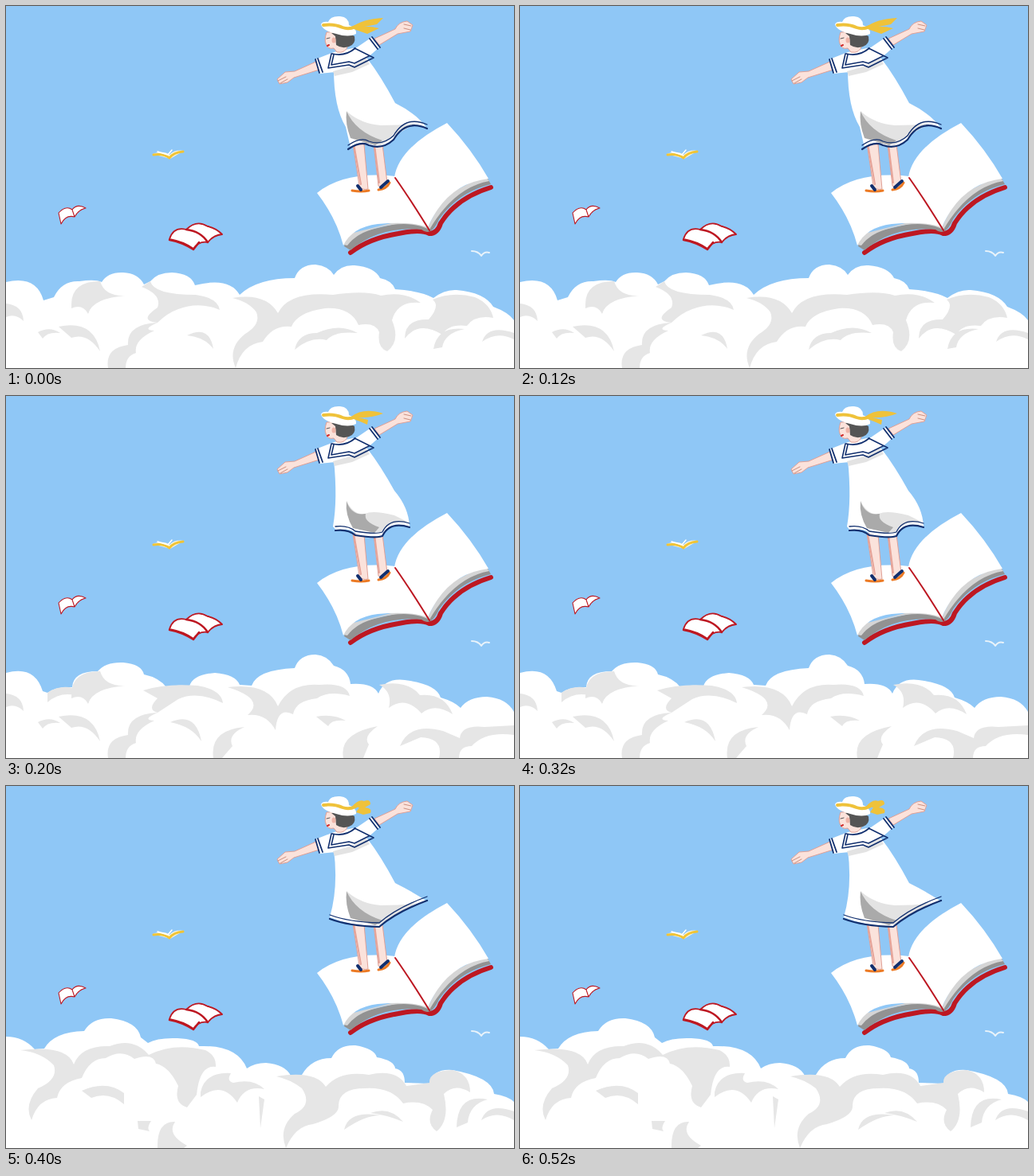
An HTML page that plays this animation: 637 by 455 pixels, repeating every 0.6 s.

```html
<!DOCTYPE html>
<html lang="en">
<head>
<meta charset="utf-8">
<title>Flying on a book</title>
<style>
html, body { margin: 0; width: 100%; height: 100%; overflow: hidden; background: #8fc7f6 }
svg { display: block; width: 100%; height: 100% }
.line { fill: none; stroke-linecap: round; stroke-linejoin: round }
.navy { stroke: #12306f }
.red { stroke: #bd1822 }
.skin { fill: #fbe2db; stroke: #dfa096; stroke-width: 1 }
</style>
</head>
<body>
<svg viewBox="0 0 637 455" fill="#fff">
  <rect width="637" height="455" fill="#8fc7f6"/>
  <path id="cloud"/>
  <path id="shade" fill="#e6e6e6"/>

  <!-- distant books and birds -->
  <path d="M184 186Q197 181 205 187Q212 180 223 182L206 192Z" fill="#fbf5df"/>
  <path class="line" d="M185 187Q197 185 205 191Q210 184 222 183" stroke="#f0c437" stroke-width="3"/>
  <path class="line" d="M190 183L203 187L208 181" stroke="#fff" stroke-width="1.5"/>
  <path class="line" d="M584 308Q592 308 596 314Q600 308 606 310" stroke="#e9f3fa" stroke-width="2"/>
  <path class="line red" d="M66 260Q75 250 83 256L86 265Q75 262 69 274ZM83 256Q89 248 100 254Q91 256 86 265Z" style="fill:#fff" stroke-width="1.1"/>
  <path class="line red" d="M205 293Q210 277 226 281Q239 268 253 277Q263 279 271 287Q260 288 253 297Q242 295 235 305Q222 296 205 293Z" style="fill:#fff" stroke-width="1.8"/>
  <path class="line red" d="M226 281Q244 283 253 297M205 294Q221 297 235 306L242 297" stroke-width="2.5"/>

  <!-- large book -->
  <path class="line red" d="M432 310Q455 292 492 286Q520 280 531 286Q541 286 545 273Q565 241 608 228" stroke-width="6"/>
  <path d="M424 302L428 288L518 267L531 278L552 243L603 215L608 224Q567 234 543 268Q533 291 521 281Q469 276 432 307Z" fill="#929292"/>
  <path d="M423 300L428 287L518 264L530 276L548 240L600 213L606 220Q562 228 531 281Q505 268 465 279Q440 285 428 301Z" fill="#d5d5d5"/>
  <path d="M390 235Q425 207 488 214L528 278Q508 270 466 274Q434 278 423 301Q414 266 390 235Z"/>
  <path d="M487 215Q493 178 553 147Q584 180 605 217Q553 223 529 278Z"/>
  <path class="line red" d="M488 216Q507 243 531 282" stroke-width="2"/>

  <!-- legs and sandals -->
  <path class="skin" d="M435 173L443 226Q446 232 454 230L449 174ZM461 174L467 226Q471 230 478 222L472 174Z"/>
  <path class="line" d="M436 173L445 224M462 174L468 222" stroke="#e6a499" stroke-width="2"/>
  <path class="line" d="M434 232Q446 234 455 232M467 231Q477 230 481 222" stroke="#ec7a24" stroke-width="3"/>
  <path class="line navy" d="M441 226L445 231M470 228L479 220" stroke-width="4"/>

  <!-- arms -->
  <path class="skin" d="M391 69L362 82L350 83L340 92L343 98L353 96L361 90L393 80ZM462 41L488 29Q492 20 503 19L510 24L507 32L491 35L468 49Z"/>
  <path class="line" d="M341 94L351 89M344 97L353 92M499 23L508 25M499 28L507 30" stroke="#cc8f80" stroke-width="1"/>

  <!-- dress -->
  <path id="dress"/>
  <path id="fold" fill="#e3e3e3"/>
  <path id="crease" fill="#aaa"/>
  <path id="hem" class="line navy" stroke-width="2.2"/>
  <path id="trim" class="line navy" stroke-width="1.3" transform="translate(0 -5)"/>
  <path d="M388 67L411 58L440 52L459 39L468 52L451 67L413 83L393 85Z"/>
  <path d="M410 82L432 76L451 66L456 73L434 83L412 88Z" fill="#e3e3e3"/>
  <path class="line navy" d="M388 67L393 84M391 66L397 83M459 39L469 52M456 41L466 54M409 60Q425 64 438 53" stroke-width="1.8"/>
  <path class="line navy" d="M408 60L404 78L430 74L437 77L461 65L437 53M411 61L408 74L430 70L437 72L455 63" stroke-width="1.6"/>

  <!-- head and hat -->
  <path class="skin" d="M402 33Q399 42 401 47Q403 55 411 53L415 58Q426 60 429 49L419 32Z"/>
  <path d="M408 34Q425 30 437 38Q439 48 430 51Q421 54 414 49L413 38Z" fill="#555"/>
  <ellipse cx="411" cy="43" rx="2.5" ry="3.5" fill="#efb4a8"/>
  <path class="line" d="M402 41L406 40" stroke="#555" stroke-width="1"/>
  <path class="line" d="M403 50L405 49" stroke="#d22b2b" stroke-width="2"/>
  <path d="M395 23Q397 19 404 20Q407 12 419 13Q430 14 430 24Q440 28 439 35Q430 40 414 35Q397 31 395 23Z"/>
  <path class="line" d="M398 24Q411 22 422 27Q430 30 438 26" stroke="#efc23a" stroke-width="4"/>
  <path id="ribbon" fill="#efc23a"/>
</svg>
<script>
const leftShade = 'M0 374Q21 376 22 396Q12 386 0 391ZM40 410Q55 402 68 411Q52 409 46 418Z' +
  'M66 403Q110 394 118 434Q102 410 82 417ZM82 375Q82 346 118 346Q124 366 152 364Q108 367 103 387Q96 374 82 380Z' +
  'M128 455Q124 430 153 426Q151 400 190 398Q169 407 186 408Q160 420 163 436Q150 440 150 455Z';

const windFold = 'M428 133Q445 148 470 150Q497 150 515 147L492 160L470 175L449 172Q432 155 428 133Z';
const windCrease = 'M427 132Q438 158 472 169L463 175L432 166Q425 148 427 132Z';

const poses = [
  {
    cloud: 'M0 347Q38 338 47 370L60 366Q70 345 92 346Q112 343 120 347Q128 334 147 335Q166 336 173 350L181 346Q190 335 208 335Q232 336 237 351Q280 340 293 363Q315 342 362 342Q368 325 388 325Q405 327 411 338Q420 325 437 326Q462 328 469 342Q484 345 488 356Q520 358 536 367Q550 356 565 357Q600 360 611 378Q630 385 637 395V455H0Z',
    shade: leftShade + 'M170 353L181 346Q185 363 238 363Q266 367 268 382Q242 371 216 381Q202 386 190 398Q165 396 190 379Q196 363 170 353Z' +
      'M227 414Q255 400 260 431Q249 416 227 414ZM284 367Q326 360 341 386Q355 358 410 363Q450 357 470 364Q500 358 520 373Q491 370 484 395Q495 421 478 434Q465 429 468 410Q463 397 442 401Q432 378 400 380Q365 385 358 403Q335 400 322 422Q296 425 288 455Q277 430 300 412Q320 400 314 385Q305 372 284 367Z' +
      'M362 432Q366 411 390 411Q418 398 441 411Q412 408 402 420Q382 415 362 432ZM500 418Q500 393 530 394Q545 377 535 369Q560 358 588 366Q607 374 611 392Q588 388 578 402Q555 399 547 413Q517 395 500 418Z' +
      'M536 431Q541 402 575 406Q550 411 547 429ZM597 422Q604 400 637 411V419Q616 408 597 422Z',
    dress: 'M411 80Q411 127 426 152L432 178Q445 168 455 176Q470 180 486 168Q501 143 528 154Q516 136 488 122Q470 88 453 66Z',
    hem: 'M429 180Q445 169 455 175Q472 181 486 168Q501 142 528 154',
    fold: windFold,
    crease: windCrease,
    ribbon: 'M433 27Q447 16 473 15L465 23Q450 26 439 27Q453 24 468 28L453 35L436 29Z'
  },
  {
    cloud: 'M0 348Q36 338 46 371L52 373Q62 365 83 366Q84 346 115 346Q125 334 147 335Q170 337 173 350Q192 354 201 366Q215 362 230 365Q234 350 262 348Q288 350 293 363L308 364Q315 344 362 342Q368 325 388 325Q403 326 411 339Q430 344 432 362Q460 360 467 374Q475 354 500 357Q540 362 545 379Q562 384 570 392Q580 378 603 378Q628 380 637 397V455H0Z',
    shade: leftShade + 'M52 373Q67 363 84 367L86 376Q67 372 52 385ZM172 370Q200 361 240 364Q270 369 272 386Q240 370 216 381L190 398Q176 394 190 380Z' +
      'M206 410Q238 396 245 434Q233 415 206 410ZM260 455Q255 420 299 416Q277 426 284 440L271 455ZM278 366Q329 360 341 390Q356 360 393 363Q427 360 431 377Q405 370 390 380Q363 383 360 400Q340 390 338 420Q326 398 303 401Q326 381 278 366Z' +
      'M389 403Q410 399 426 408Q408 406 404 415ZM423 455Q417 424 466 415Q447 428 455 438L448 455ZM468 363Q503 356 519 376Q550 373 560 400Q537 385 521 399Q501 376 480 392Q485 372 468 363Z' +
      'M494 440Q506 410 548 421L569 430Q571 413 600 416L637 414V426Q601 421 584 440Q568 440 568 455H543Q549 430 520 429Z',
    dress: 'M411 80Q416 130 410 164L415 170Q430 164 440 174Q466 180 473 175Q480 158 506 164Q505 140 487 119Q470 88 453 66Z',
    hem: 'M413 169Q429 167 438 175Q464 179 472 176Q481 157 506 165',
    fold: 'M427 132Q436 150 450 148Q460 143 487 150L503 158Q481 157 470 172L436 166Z',
    crease: 'M427 132Q433 151 451 148Q448 158 468 165L462 172L435 166Q425 149 427 132Z',
    ribbon: 'M433 26Q448 14 473 22Q458 28 442 27L454 30L453 36Q447 33 436 29Z'
  },
  {
    cloud: 'M0 315Q22 315 36 331L48 330Q60 309 98 308Q108 291 132 292Q165 296 169 316L178 323Q190 316 215 317Q240 318 242 327Q290 325 302 355Q312 348 326 348Q350 350 357 364L371 363Q383 342 408 342Q416 325 438 326Q462 330 465 341Q487 345 488 355Q500 357 500 373L531 374Q535 355 560 357Q610 366 612 387Q630 390 637 397V455H0Z',
    shade: 'M18 332Q77 325 85 350Q94 326 130 327Q160 315 179 338Q210 322 250 332Q264 339 263 353Q243 350 239 388L227 404Q210 399 216 377Q204 352 188 349Q185 335 161 343Q145 330 125 342Q105 342 95 367Q68 372 64 392Q40 393 32 420Q22 401 40 380Q66 369 60 351Q45 335 18 332Z' +
      'M95 383Q126 369 148 386V400Q129 383 107 392ZM244 385Q249 359 282 361Q276 371 285 373Q310 367 324 381Q299 376 290 398Q271 370 244 391ZM165 421H182Q176 430 180 434L166 431ZM190 455Q189 421 212 422Q201 438 227 452L223 455Z' +
      'M339 365Q388 357 401 378Q419 357 455 363Q490 355 502 377L531 373Q530 358 560 357Q582 362 582 385Q563 373 549 387Q557 420 540 434Q526 424 535 407Q522 394 498 399Q483 378 450 380Q418 380 417 401Q419 415 385 425Q363 427 351 455Q341 430 362 412Q385 401 371 380Q357 369 339 365Z' +
      'M424 432Q429 407 471 414Q451 413 424 432ZM457 411Q481 402 498 422Q476 413 457 411ZM565 429Q566 386 604 394Q581 400 579 423ZM596 420Q604 397 637 409V420Q615 407 596 420ZM317 390L324 394L319 430Z',
    dress: 'M411 80Q417 127 406 165Q430 175 466 178Q485 160 528 145Q510 133 488 122Q470 88 453 66Z',
    hem: 'M406 167Q430 176 468 177Q490 158 528 144',
    fold: windFold,
    crease: windCrease,
    ribbon: 'M434 26Q442 16 449 19Q457 16 457 23L450 27Q460 28 457 34L448 36L439 33L443 27Z'
  }
];

let shown = -1;
function draw() {
  const index = Math.floor(performance.now() / 200) % poses.length;
  if (index !== shown) {
    shown = index;
    const pose = { ...poses[index], trim: poses[index].hem };
    for (const id in pose) document.getElementById(id).setAttribute('d', pose[id]);
  }
  requestAnimationFrame(draw);
}
draw();
</script>
</body>
</html>
```
